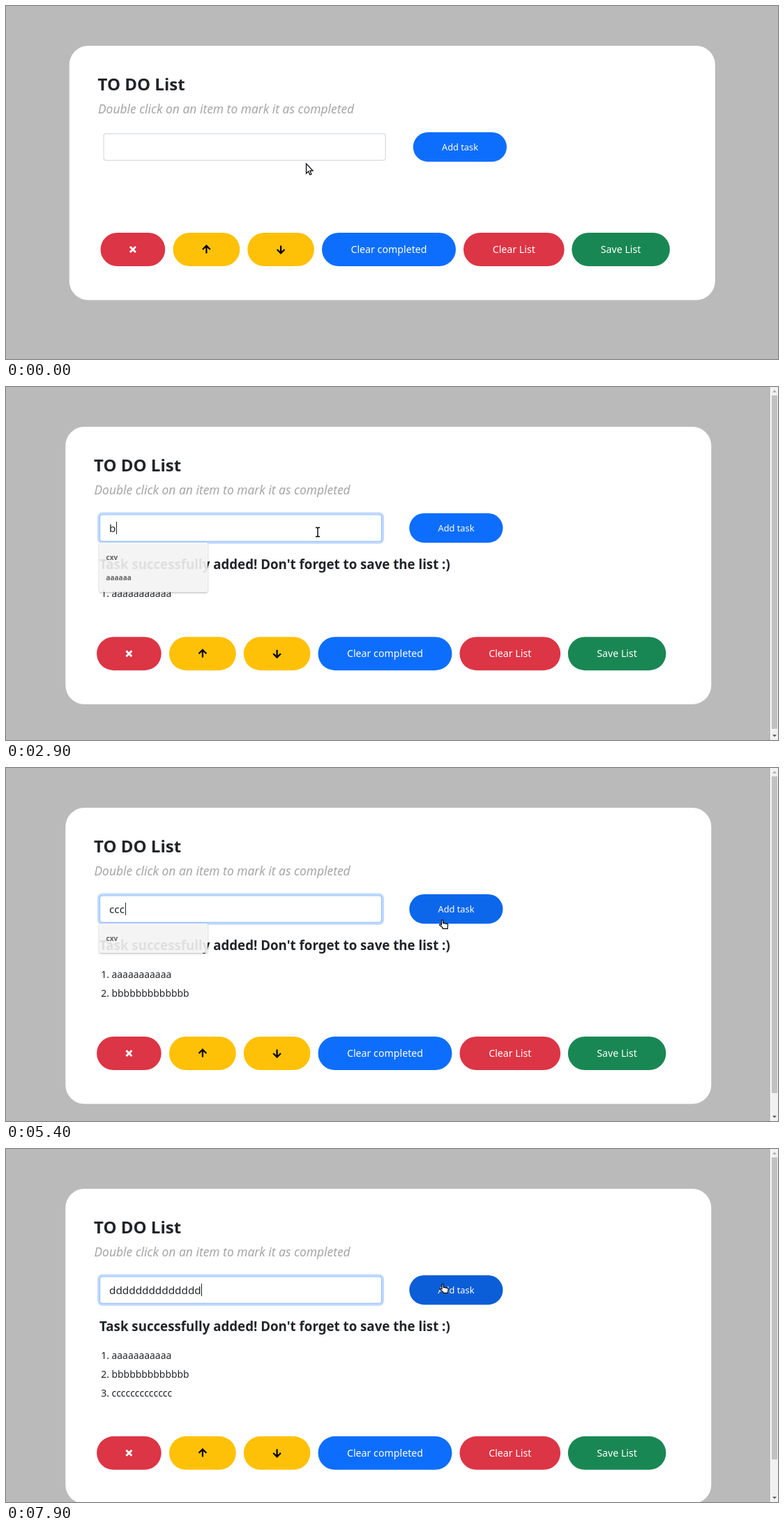
Write an HTML page with a canvas that moves like this. It is 1107 by 506 pixels and loops after 8 s.

```html
<!DOCTYPE html>
<html lang="en">
<head>
<meta charset="utf-8">
<title>To do list</title>
<style>
html, body { margin: 0; width: 100%; height: 100%; overflow: hidden; background: #bababa; }
canvas { display: block; }
</style>
</head>
<body>
<canvas id="stage" width="1107" height="506"></canvas>
<script>
const ctx = document.getElementById('stage').getContext('2d');
const LOOP = 8000, STEP = 100, FADE = 150, REPEAT = 30, ROW = 26.8;
const FAMILY = '"Noto Sans", "Open Sans", sans-serif';
const INK = '#212529', BLUE = [13, 110, 253], BLUE_DARK = [11, 94, 215];

// One round per task: focus the field, hold a key, press the button.
const rounds = [
  { ch: 'a', count: 11, focus: 480, key: 1000, hold: 1360, hover: 1500, press: 2140, add: 2300 },
  { ch: 'b', count: 13, focus: 2750, key: 2900, hold: 3400, hover: 3250, press: 3960, add: 4100 },
  { ch: 'c', count: 13, focus: 4580, key: 5000, hold: 5335, hover: 5330, press: 6060, add: 6200 },
  { ch: 'd', count: 14, focus: 6680, key: 7000, hold: 7490, hover: 7750, press: 9e3, add: 9e3 }
];

const menus = [
  { from: 1000, to: 1700, items: ['aaaaaa'] },
  { from: 2800, to: 3000, items: ['cxv', 'aaaaaa'] },
  { from: 4900, to: 5000, items: ['cxv', 'aaaaaa'] },
  { from: 5000, to: 5500, items: ['cxv'] },
  { from: 6900, to: 7100, items: ['cxv', 'aaaaaa'] }
];

const mouse = [
  [0, 435, 234, 'arrow'], [100, 441, 218, 'arrow'], [200, 445, 204, 'beam'],
  [1200, 445, 204, 'beam'], [1600, 640, 206, 'hand'], [1700, 650, 206, 'hand'],
  [1900, 650, 206, 'hand'], [2200, 665, 201, 'hand'], [2300, 665, 201, 'hand'],
  [2400, 660, 203, 'hand'], [2600, 660, 203, 'hand'], [2800, 447, 208, 'beam'],
  [3100, 447, 208, 'beam'], [3300, 640, 200, 'hand'], [3500, 664, 192, 'hand'],
  [3800, 653, 205, 'hand'], [4200, 653, 205, 'hand'], [4300, 645, 206, 'hand'],
  [4400, 645, 206, 'hand'], [4600, 447, 206, 'beam'], [5000, 447, 206, 'beam'],
  [5400, 627.5, 224, 'hand'], [5700, 652, 219, 'hand'], [5800, 654, 220, 'hand'],
  [6100, 654, 220, 'hand'], [6200, 530, 199, 'hand'], [6500, 447, 206, 'beam'],
  [7500, 447, 206, 'beam'], [7800, 612, 202, 'hand'], [7900, 628, 200, 'hand']
];

const buttons = [
  { x: 135.6, w: 92.6, fill: '#dc3545', icon: 'cross' },
  { x: 239.5, w: 95.8, fill: '#ffc107', icon: 'up' },
  { x: 346.3, w: 95.6, fill: '#ffc107', icon: 'down' },
  { x: 453, w: 192, fill: '#0d6efd', label: 'Clear completed' },
  { x: 656, w: 144.6, fill: '#dc3545', label: 'Clear List' },
  { x: 811.3, w: 140.6, fill: '#198754', label: 'Save List' }
];

const shapes = {
  arrow: new Path2D('M-4.5-8V6L-1.3 3 .8 8 3 7 .9 2.2H5Z'),
  hand: new Path2D('M-3-5.5C-3-6.8-.8-6.8-.8-5.5V-1.8L5-.7Q6.3-.4 6.2 1L5.7 4V6.3H-1.2V5L-5.8 1.2Q-6.2-.4-4.6-.2L-3 .8Z'),
  beam: new Path2D('M-3-6.5H-1L0-5.5 1-6.5H3M0-5.5V5.5M-3 6.5H-1L0 5.5 1 6.5H3'),
  cross: new Path2D('M-4-4L4 4M4-4L-4 4'),
  up: new Path2D('M0 5.5V-5M-5.4 0L0-5.4 5.4 0')
};

const clamp = v => Math.max(0, Math.min(1, v));
const ramp = (t, on, off) => clamp((t - on) / FADE) - clamp((t - off) / FADE);
const mix = (a, b, k) => `rgb(${a.map((v, i) => Math.round(v + (b[i] - v) * k))})`;

function text(str, x, y, size, color = INK, style = '', align = 'left') {
  ctx.font = `${style} ${size}px ${FAMILY}`;
  ctx.fillStyle = color;
  ctx.textAlign = align;
  ctx.fillText(str, x, y);
}

function box(x, y, w, h, r, fill) {
  ctx.beginPath();
  ctx.roundRect(x, y, w, h, r);
  ctx.fillStyle = fill;
  ctx.fill();
}

function line(path, width, color) {
  ctx.lineWidth = width;
  ctx.strokeStyle = color;
  ctx.stroke(path);
}

// Focus glow: spread and opacity grow together.
function ring(x, y, w, h, r, k, rgb, alpha) {
  if (k <= 0) return;
  const s = 3 * k;
  ctx.beginPath();
  ctx.roundRect(x - s, y - s, w + 2 * s, h + 2 * s, r + s);
  ctx.roundRect(x, y, w, h, r);
  ctx.fillStyle = `rgba(${rgb},${alpha * k})`;
  ctx.fill('evenodd');
}

function typed(r, t) {
  if (t < r.key) return 0;
  return Math.min(r.count, 1 + Math.max(0, Math.floor((t - r.hold) / REPEAT)));
}

function drawField(t) {
  const k = rounds.reduce((sum, r) => sum + ramp(t, r.focus, r.press), 0);
  ring(139.6, 182.6, 405, 39.2, 4, k, '13,110,253', 0.25);
  box(139.6, 182.6, 405, 39.2, 4, mix([206, 212, 218], [134, 183, 254], k));
  box(140.6, 183.6, 403, 37.2, 3, '#fff');

  const r = rounds.find(q => t < q.add);
  const str = r.ch.repeat(typed(r, t));
  text(str, 153.5, 208, 15.3);
  if (t < r.focus || t >= r.press) return;
  const end = r.hold + r.count * REPEAT;
  const since = t >= end ? t - end : t >= r.key ? 0 : t - r.focus;
  if (since % 1000 < 500) {
    ctx.fillStyle = INK;
    ctx.fillRect(Math.round(153.5 + ctx.measureText(str).width) + 0.5, 193, 1, 18);
  }
}

function drawAdd(t) {
  let glow = 0, dark = 0;
  rounds.forEach((r, i) => {
    const next = rounds[i + 1];
    const end = next ? next.focus : LOOP * 2;
    glow += ramp(t, r.press, end);
    dark += ramp(t, r.hover, end);
  });
  ring(583.8, 181, 134.2, 42.2, 21.1, glow, '49,132,253', 0.5);
  box(583.8, 181, 134.2, 42.2, 21.1, mix(BLUE, BLUE_DARK, dark));
  text('Add task', 651, 207, 12.8, '#fff', '', 'center');
}

function drawButtons(cy) {
  for (const b of buttons) {
    const cx = b.x + b.w / 2;
    box(b.x, cy - 24, b.w, 48, 24, b.fill);
    if (b.label) {
      text(b.label, cx, cy + 5, 14.2, '#fff', '', 'center');
      continue;
    }
    ctx.save();
    ctx.translate(cx, cy);
    if (b.icon === 'down') ctx.scale(1, -1);
    if (b.icon === 'cross') line(shapes.cross, 2.8, '#fff');
    else line(shapes.up, 2.2, '#000');
    ctx.restore();
  }
}

function drawMenu(t) {
  const m = menus.find(q => t >= q.from && t < q.to);
  if (!m) return;
  ctx.save();
  ctx.globalAlpha = t >= m.to - STEP && m.to !== 5000 ? 0.86 : 1;
  ctx.shadowColor = 'rgba(0,0,0,.35)';
  ctx.shadowBlur = 3;
  ctx.shadowOffsetY = 1;
  box(139.5, 223, 155, 13 + 29 * m.items.length, 2, '#fff');
  ctx.shadowColor = 'transparent';
  m.items.forEach((s, i) => text(s, 149, 247.5 + 29 * i, 10, '#4a4a4a', 'bold'));
  ctx.restore();
}

function triangle(x, y, d, color) {
  ctx.beginPath();
  ctx.moveTo(x - 3, y - d);
  ctx.lineTo(x + 3, y - d);
  ctx.lineTo(x, y + d);
  ctx.fillStyle = color;
  ctx.fill();
}

function drawScrollbar(count) {
  ctx.fillStyle = '#f1f1f1';
  ctx.fillRect(1096, 0, 11, 506);
  ctx.fillStyle = '#fff';
  ctx.fillRect(1096, 0, 1, 506);
  ctx.fillStyle = '#c1c1c1';
  ctx.fillRect(1098, 12, 8, [478, 454, 433][count - 1]);
  triangle(1102, 6, -1.5, '#a3a3a3');
  triangle(1102, 500, 1.5, '#505050');
}

function drawMouse(t) {
  let i = mouse.length - 1;
  while (mouse[i][0] > t) i--;
  const a = mouse[i], b = mouse[i + 1] || a;
  const k = a === b ? 0 : (t - a[0]) / (b[0] - a[0]);
  const path = shapes[a[3]];
  ctx.save();
  ctx.translate(a[1] + (b[1] - a[1]) * k, a[2] + (b[2] - a[2]) * k);
  if (a[3] === 'beam') {
    line(path, 3, '#fff');
    line(path, 1.4, '#000');
  } else {
    ctx.fillStyle = '#fff';
    ctx.fill(path);
    line(path, 1.2, '#000');
  }
  ctx.restore();
}

function draw(t) {
  const done = rounds.filter(r => t >= r.add), n = done.length;
  const cy = n ? 382.2 + ROW * (n - 1) : 349;
  ctx.fillStyle = '#bababa';
  ctx.fillRect(0, 0, 1107, 506);

  ctx.save();
  if (n) ctx.translate(-5.5, 0);
  box(90.8, 57, 926, cy + 15.5, 27, '#fff');
  text('TO DO List', 131.5, 121, 24, INK, 'bold');
  text('Double click on an item to mark it as completed', 132, 153.5, 17.4, '#a6a6a6', 'italic');
  drawField(t);
  drawAdd(t);
  if (n) text("Task successfully added! Don't forget to save the list :)", 139.5, 261, 18.7, INK, 'bold');
  done.forEach((r, i) => {
    const y = 301 + ROW * i;
    text(`${i + 1}.`, 153.5, y, 14, INK, '', 'right');
    text(r.ch.repeat(r.count), 157, y, 13.9);
  });
  drawButtons(cy);
  drawMenu(t);
  ctx.restore();

  if (n) drawScrollbar(n);
  drawMouse(t);
}

const start = performance.now();
function tick() {
  const t = (performance.now() - start) % LOOP;
  draw(Math.floor(t / STEP) * STEP);
  requestAnimationFrame(tick);
}
tick();
</script>
</body>
</html>
```
